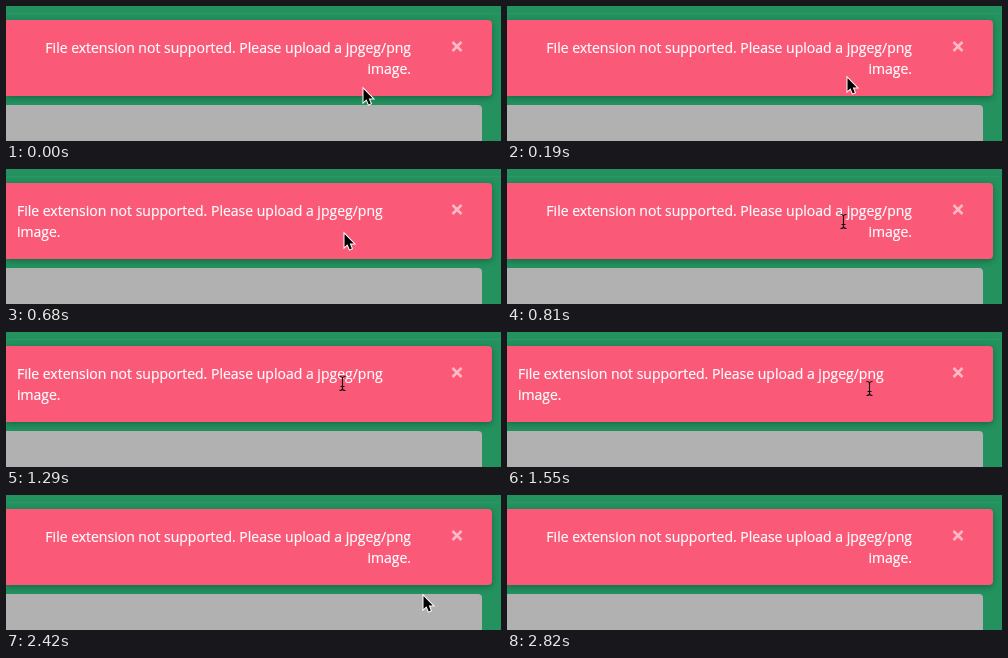
Recreate the animation shown at these times as an HTML page. Size 495 by 135 pixels, loop 3.26 s.

```html
<!DOCTYPE html>
<html lang="en">
<head>
<meta charset="utf-8">
<title>Upload error</title>
<style>
html, body { margin: 0; width: 100%; height: 100%; overflow: hidden; background: #23925f; }
div, svg { position: absolute; left: 0; }
#rule { top: 7px; width: 495px; height: 1px; background: #2b9766; }
#panel { top: 99px; width: 476px; height: 36px; border-radius: 0 4px 0 0; background: #b1b1b1; }
#toast { top: 14px; width: 486px; height: 76px; border-radius: 0 4px 4px 0; background: #fb5978; box-shadow: 0 2px 6px rgba(0, 0, 0, .3); }
#message { left: 11px; top: 31px; width: 394px; font: 14px/21px "Open Sans", sans-serif; color: #fff; -webkit-text-stroke: .2px #fff; }
svg { top: 0; width: 495px; height: 135px; overflow: hidden; }
</style>
</head>
<body>
<div id="rule"></div>
<div id="panel"></div>
<div id="toast"></div>
<div id="message">File extension not supported. Please upload a jpgeg/png<br>image.</div>
<svg viewBox="0 0 495 135" fill="none">
  <path d="M446.5 36l9 9m0-9l-9 9" stroke="#fdb9c5" stroke-width="2.5"/>
  <g id="cursor">
    <path id="arrow" d="M-.5 1V14L2.5 11.3L4.7 16.4L6.8 15.5L4.7 10.5H8.8Z" fill="#000" stroke="#fff" stroke-width="2" paint-order="stroke"/>
    <path id="beam" d="M-4.5-6.5Q-1.5-6.5-1.5-4.5Q-1.5-6.5 1.5-6.5M-1.5-5V6M-4.5 7.5Q-1.5 7.5-1.5 5.5Q-1.5 7.5 1.5 7.5M-3.5 3.5h4" stroke="#111" stroke-width="1.1"/>
  </g>
</svg>
<script>
const LOOP = 3260;
// pointer moves: start time, end time, dx, dy
const moves = [
  [40, 230, -19, -12],
  [590, 840, -1, -19],
  [1270, 1550, 26, 5],
  [2100, 2600, 76, 62],
  [2560, 2820, 7, 19]
];
// the message switches sides at each of these times
const flips = [250, 420, 590, 810, 1290, 2260];

const [message, cursor, arrow, beam] =
  ["message", "cursor", "arrow", "beam"].map(id => document.getElementById(id));

function ease(t, from, to) {
  const k = Math.min(1, Math.max(0, (t - from) / (to - from)));
  return k * k * (3 - 2 * k);
}

function draw(t) {
  let x = 358, y = 82;
  for (const [from, to, dx, dy] of moves) {
    const k = ease(t, from, to);
    x += dx * k;
    y += dy * k;
  }
  const overText = y < 63;
  const flipped = flips.filter(f => f <= t).length % 2;
  message.style.textAlign = flipped ? "left" : "right";
  cursor.setAttribute("transform", `translate(${Math.round(x)} ${Math.round(y)})`);
  arrow.style.display = overText ? "none" : "";
  beam.style.display = overText ? "" : "none";
}

const start = performance.now();
function tick() {
  draw((performance.now() - start) % LOOP);
  requestAnimationFrame(tick);
}
tick();
</script>
</body>
</html>
```
